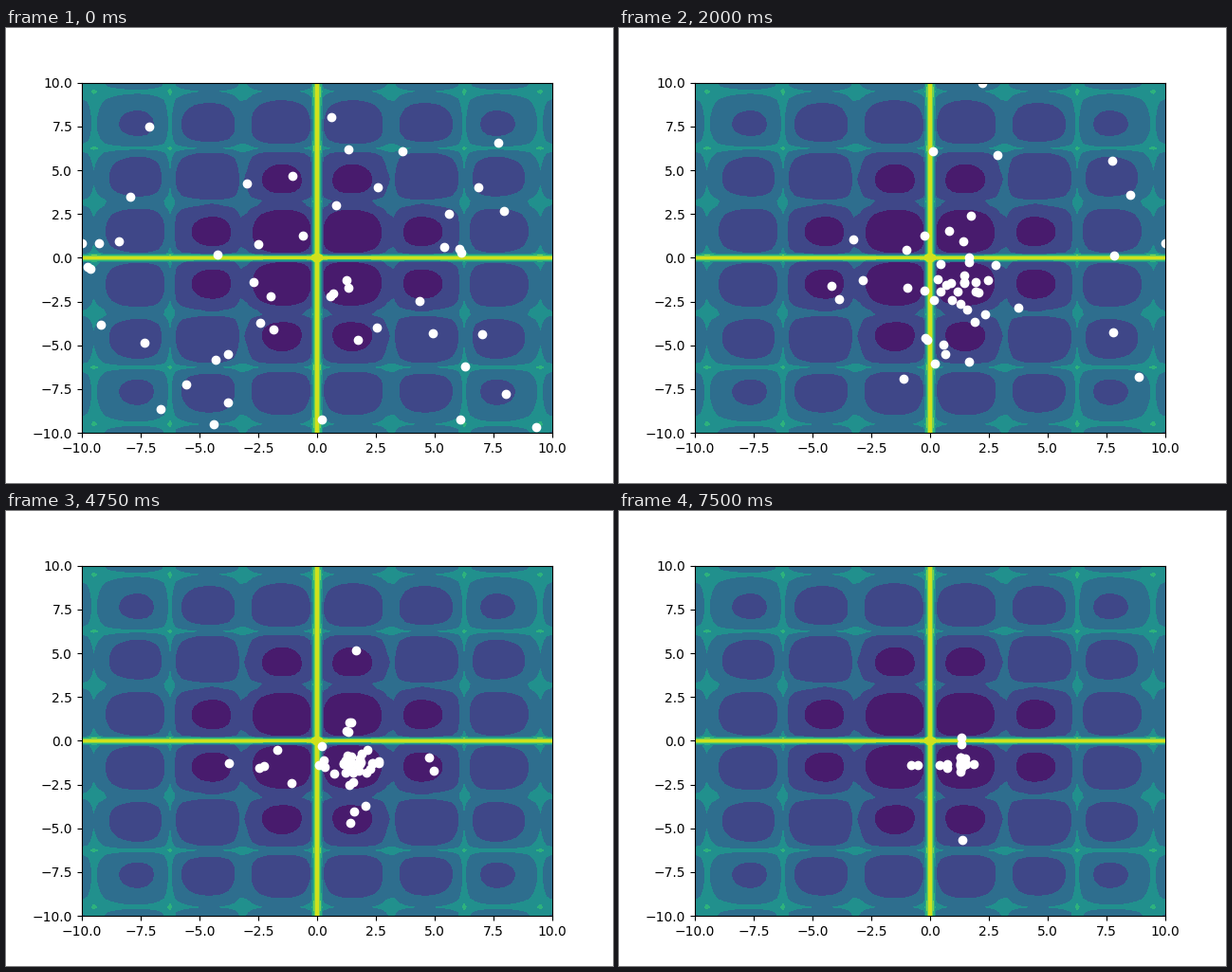
Write a matplotlib script that moves like this. It is 640 px wide and 480 px high and loops after 7750 ms.

```python
import numpy as np
import matplotlib.pyplot as plt
from matplotlib.animation import FuncAnimation

FRAMES = 31
INTERVAL = 250
BOUND = 10
W_START, W_END = 0.9, 0.4
C_SELF, C_SWARM = 1.0, 2.0

START = np.array([
    (-7.12, 7.49), (-7.93, 3.48), (-8.42, 0.96), (-9.29, 0.86), (-10, 0.82),
    (-9.76, -0.52), (-9.62, -0.65), (-9.2, -3.83), (-7.32, -4.87), (-6.67, -8.62),
    (-5.57, -7.25), (-4.31, -5.83), (-3.81, -5.52), (-3.81, -8.27), (-4.4, -9.5),
    (-4.24, 0.21), (-3.0, 4.26), (-1.03, 4.66), (-2.5, 0.76), (-0.62, 1.29),
    (-2.72, -1.38), (-1.96, -2.19), (-2.43, -3.71), (-1.85, -4.11), (0.6, 8.02),
    (1.35, 6.2), (3.63, 6.07), (2.6, 4.05), (0.8, 2.99), (7.71, 6.56),
    (6.87, 4.02), (7.96, 2.7), (5.62, 2.49), (5.4, 0.63), (6.06, 0.5),
    (6.12, 0.27), (0.57, -2.18), (0.69, -2.06), (1.23, -1.28), (1.35, -1.73),
    (4.37, -2.45), (2.54, -3.98), (1.73, -4.7), (4.93, -4.3), (7.0, -4.37),
    (6.28, -6.18), (8.02, -7.77), (6.07, -9.25), (9.32, -9.66), (0.22, -9.24)])


def cross_in_tray(x, y):
    peak = np.exp(np.abs(100 - np.hypot(x, y) / np.pi))
    return -1e-4 * (np.abs(np.sin(x) * np.sin(y) * peak) + 1) ** 0.1


def swarm_path(seed):
    """Particle swarm optimisation with a falling inertia weight."""
    rng = np.random.RandomState(seed)
    pos = START.copy()
    vel = rng.uniform(-1, 1, pos.shape)
    best = pos.copy()
    best_cost = cross_in_tray(*best.T)
    path = [pos]
    for w in np.linspace(W_START, W_END, FRAMES - 1):
        leader = best[best_cost.argmin()]
        r_self, r_swarm = rng.rand(2, *pos.shape)
        vel = (w * vel + C_SELF * r_self * (best - pos)
               + C_SWARM * r_swarm * (leader - pos))
        pos = np.clip(pos + vel, -BOUND, BOUND)
        cost = cross_in_tray(*pos.T)
        better = cost < best_cost
        best[better] = pos[better]
        best_cost[better] = cost[better]
        path.append(pos)
    return path


path = swarm_path(seed=4)

fig, ax = plt.subplots(figsize=(6.4, 4.8), dpi=100)
grid = np.linspace(-BOUND, BOUND, 81)
X, Y = np.meshgrid(grid, grid)
ax.contourf(X, Y, cross_in_tray(X, Y), levels=np.linspace(-2.1, 0, 8))
ax.set_xlim(-BOUND, BOUND)
ax.set_ylim(-BOUND, BOUND)
dots, = ax.plot([], [], "wo")


def update(i):
    dots.set_data(*path[i].T)
    return dots,


anim = FuncAnimation(fig, update, frames=FRAMES, interval=INTERVAL,
                     repeat=True, repeat_delay=0)
plt.show()
```
